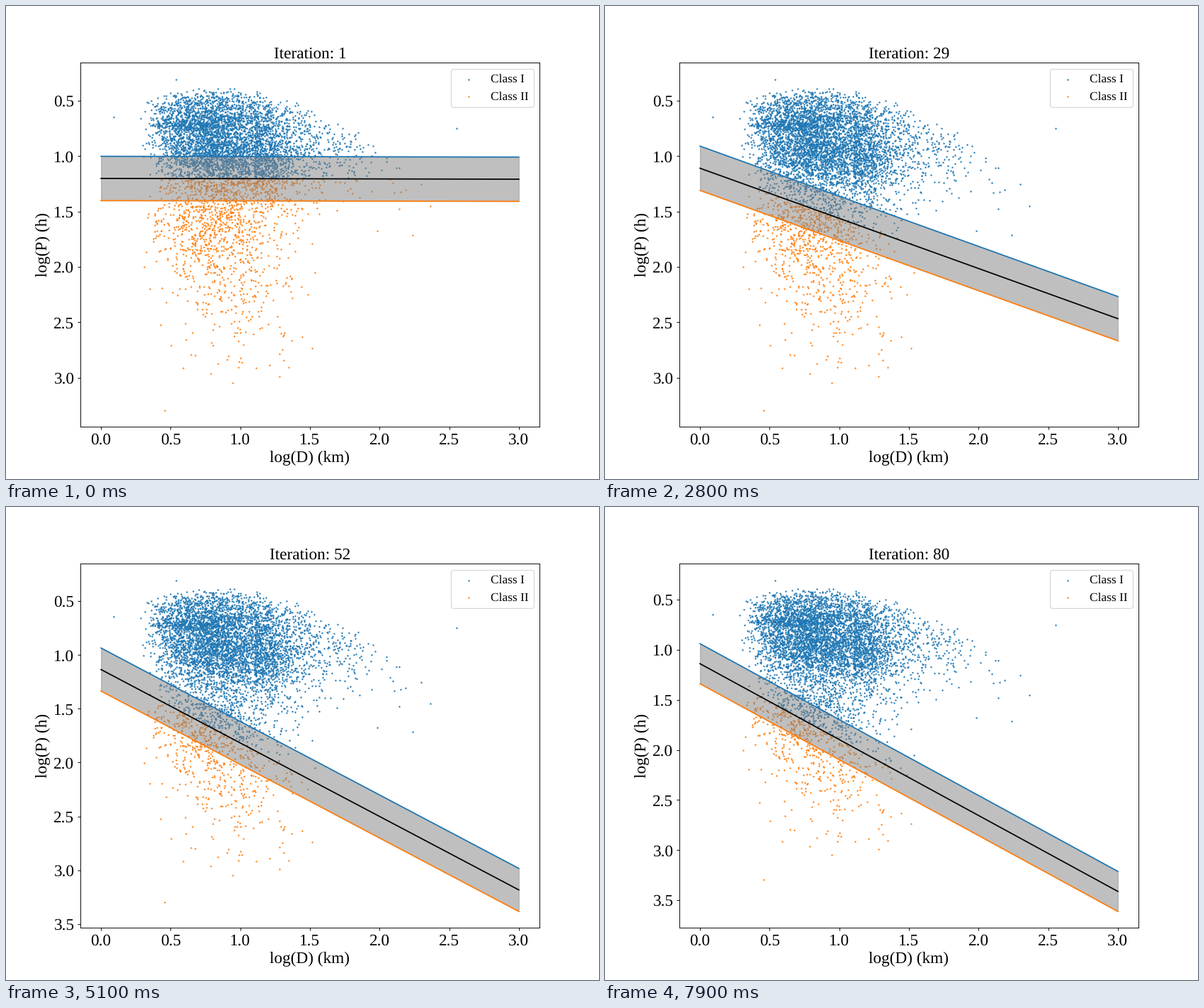
Recreate the animation shown at these times as a matplotlib script. Size 837 by 669 pixels, loop 8 s.

```python
import matplotlib.pyplot as plt
import numpy as np
from matplotlib.animation import FuncAnimation
from matplotlib.ticker import MultipleLocator

FRAMES, INTERVAL = 80, 100
HALF_GAP = 0.2
X_END = 3.0

plt.rcParams.update({
    "font.family": "Liberation Serif",
    "font.size": 20,
    "axes.titlesize": 20,
    "legend.fontsize": 15,
    "text.hinting": "none",
})


def linear(t):
    return t


def speed_up(t):
    return t ** 1.2


def slow_down(t):
    return 1 - (1 - t) ** 3


def smooth(t):
    return t * t * (3 - 2 * t)


# Iteration, line height at log D = 0 and at log D = 3, easing towards them
KEYS = [
    (1, 1.2015, 1.2085, linear),
    (20, 1.114, 1.988, speed_up),
    (38, 1.104, 3.09, speed_up),
    (44, 1.132, 3.178, slow_down),
    (58, 1.138, 3.187, linear),
    (71, 1.12, 3.407, smooth),
    (80, 1.139, 3.412, linear),
]


def line_ends(step):
    for (s0, a0, b0, _), (s1, a1, b1, ease) in zip(KEYS, KEYS[1:]):
        if step <= s1:
            t = ease((step - s0) / (s1 - s0))
            return a0 + (a1 - a0) * t, b0 + (b1 - b0) * t


def make_points(rng):
    def cloud(n, x, y):
        return np.column_stack([x(n), y(n)])

    def normal(mean, sd):
        return lambda n: rng.normal(mean, sd, n)

    def gamma(start, shape, scale):
        return lambda n: start + rng.gamma(shape, scale, n)

    core = cloud(2900, normal(0.81, 0.26), normal(0.73, 0.19))
    streak = cloud(130, normal(0.6, 0.11), normal(0.715, 0.025))
    mid = cloud(1750, normal(0.89, 0.25), gamma(0.85, 1.7, 0.2))
    tail = cloud(1000, gamma(1.1, 1, 0.33), normal(0.93, 0.27))
    low = cloud(640, normal(0.3, 0.26), gamma(1.4, 2, 0.26))
    low[:, 0] += 0.27 * low[:, 1]

    # Soft upper edge, bent down on both sides, and a soft left edge
    pts = np.vstack([core, streak, mid, tail, low])
    x, y = pts.T
    fuzz = rng.random((2, len(x)))
    top = 0.37 + 0.35 * (x - 0.78) ** 2 + 0.09 * fuzz[0]
    keep = (x > 0.26 + 0.16 * fuzz[1]) & (x < 2.5) & (y > top) & (y < 3.1)
    keep &= (y < 2.2) | (x < 1.55)

    extremes = [(0.09, 0.645), (0.54, 0.3065), (2.555, 0.75), (0.455, 3.2965)]
    return np.vstack([pts[keep], extremes])


points = make_points(np.random.default_rng(7))
y_min, y_max = points[:, 1].min(), points[:, 1].max()

fig, ax = plt.subplots(figsize=(10, 7.993), dpi=83.7)
class_1 = ax.scatter([], [], s=1, color="C0", label="Class I")
class_2 = ax.scatter([], [], s=1, color="C1", label="Class II")
band = ax.fill_between([0, X_END], 1, 2, color="gray", alpha=0.5)
upper, = ax.plot([], [], "C0")
middle, = ax.plot([], [], "k")
lower, = ax.plot([], [], "C1")

ax.set_xlim(-0.15, 3.15)
ax.xaxis.set_major_locator(MultipleLocator(0.5))
ax.yaxis.set_major_locator(MultipleLocator(0.5))
ax.set_xlabel("log(D) (km)")
ax.set_ylabel("log(P) (h)")
ax.legend(loc="upper right")
title = ax.set_title("")


def update(i):
    step = i + 1
    a, b = line_ends(step)
    above = points[:, 1] < a + (b - a) * points[:, 0] / X_END
    class_1.set_offsets(points[above])
    class_2.set_offsets(points[~above])

    for line, dy in ((upper, -HALF_GAP), (middle, 0), (lower, HALF_GAP)):
        line.set_data([0, X_END], [a + dy, b + dy])
    band.set_verts([[(0, a - HALF_GAP), (X_END, b - HALF_GAP),
                     (X_END, b + HALF_GAP), (0, a + HALF_GAP)]])

    # The inverted axis grows once the band passes the lowest point
    bottom = max(y_max, b + HALF_GAP)
    pad = 0.05 * (bottom - y_min)
    ax.set_ylim(bottom + pad, y_min - pad)
    title.set_text(f"Iteration: {step}")
    return class_1, class_2, band, upper, middle, lower, title


anim = FuncAnimation(fig, update, frames=FRAMES, interval=INTERVAL,
                     init_func=lambda: update(0), repeat=True, repeat_delay=0)
plt.show()
```
